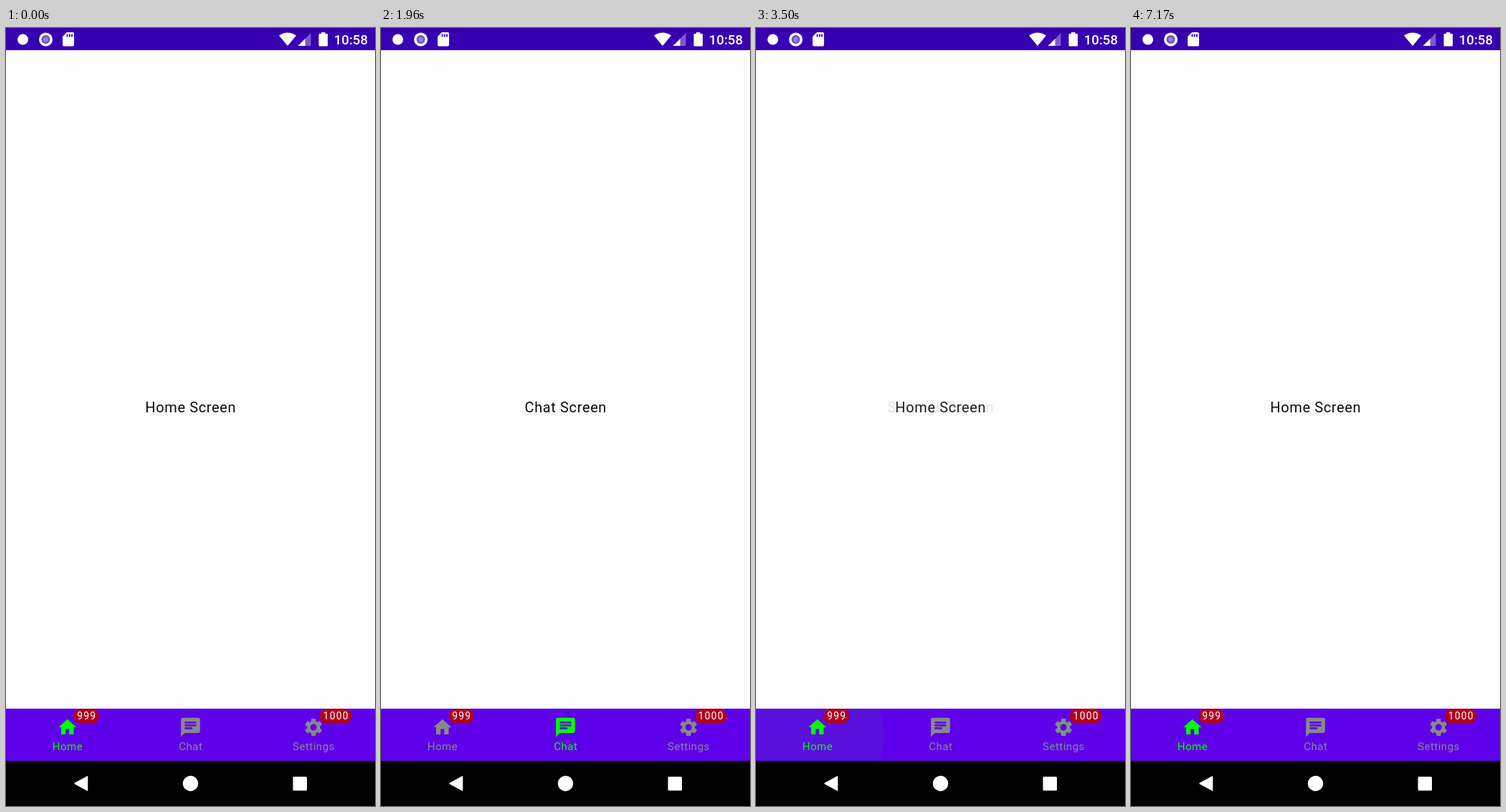
An HTML page for the animation above (7210 ms loop, 515 by 1087 pixels).

```html
<!DOCTYPE html>
<html lang="en">
<head>
<meta charset="utf-8">
<title>Bottom navigation</title>
<style>
  html, body { margin: 0; width: 100%; height: 100%; overflow: hidden; background: #fdfdfd; }
  svg { display: block; width: 100vw; height: 100vh; }
  text { font-family: Roboto, sans-serif; text-anchor: middle; }
  .title { font-size: 20px; letter-spacing: .626px; fill: #0c0c0c; }
  .label { font-size: 15px; letter-spacing: .5px; }
  .badge { font-size: 13.8px; letter-spacing: 1.3px; fill: #fff; }
  .clock { font-size: 18.6px; font-weight: 500; text-anchor: end; fill: #fff; }
</style>
</head>
<body>
<svg viewBox="0 0 515 1087" preserveAspectRatio="none">
  <defs>
    <clipPath id="barClip"><rect y="951" width="515" height="73"/></clipPath>
    <path id="tooth" d="M-2.75-6.3 -2.35-9.3Q-2.3-9.6-1.95-9.6H1.95Q2.3-9.6 2.35-9.3L2.75-6.3Z"/>
  </defs>
  <rect width="515" height="1087" fill="#fdfdfd"/>

  <!-- Status bar -->
  <rect width="515" height="31" fill="#3700b1"/>
  <g fill="#fff">
    <circle cx="23.5" cy="16" r="7.5"/>
    <circle cx="55.5" cy="16" r="9.5"/>
    <circle cx="55.5" cy="16" r="6" fill="#6a4fc6"/>
    <circle cx="55.5" cy="16" r="3.4" fill="#9282d8"/>
    <path d="M85 6H93Q95 6 95 8V23.5Q95 25.5 93 25.5H81Q79 25.5 79 23.5V12Z"/>
    <path d="M85.5 8.5V12.5M88.8 8.5V12.5M92 8.5V12.5" stroke="#3700b1" stroke-width="1.8"/>
    <path d="M393 25 381 10.5Q393 2.500 405 10.5Z"/>
    <path d="M407.500 25H425.500V7Z" opacity=".35"/>
    <path d="M407.500 25H417.500V15Z"/>
    <path d="M440 6H445.500V8H448Q449 8 449 9V24.500Q449 25.500 448 25.500H437.500Q436.500 25.500 436.500 24.500V9Q436.500 8 437.500 8H440Z"/>
  </g>
  <text class="clock" x="505" y="22.800">10:58</text>

  <g id="titles"></g>

  <!-- Tab bar -->
  <rect y="951" width="515" height="73" fill="#5f00eb"/>
  <g id="ripples" clip-path="url(#barClip)"></g>
  <g id="tabs"></g>
  <g id="badges"></g>

  <!-- System buttons -->
  <rect y="1024" width="515" height="63" fill="#000"/>
  <g fill="#fff">
    <path d="M96 1055.500 113.500 1045.800V1065.200Z" stroke="#fff" stroke-width="1.500" stroke-linejoin="round"/>
    <circle cx="257.500" cy="1055.500" r="10.700"/>
    <rect x="400.500" y="1046" width="19.500" height="19.500" rx="1.500"/>
  </g>
</svg>
<script>
const LOOP = 7210, FADE = 300, PRESS = 90;
const GREY = [136, 136, 136], GREEN = [0, 255, 0];

const gear = '<circle r="5.4" fill="none" stroke="currentColor" stroke-width="3.6"/>' +
  [0, 1, 2, 3, 4, 5].map(i => `<use href="#tooth" transform="rotate(${i * 60})"/>`).join('');
const tabs = [
  { name: 'Home', x: 85.7, scale: 1.25,
    icon: '<path d="M-2 8V2H2V8H7V0H10L0-9-10 0H-7V8Z"/>' },
  { name: 'Chat', x: 257.5, scale: 1.33,
    icon: '<path fill-rule="evenodd" d="M8-10H-8Q-10-10-10-8V10L-6 6H8Q10 6 10 4V-8Q10-10 8-10ZM-6-3H6V-1H-6ZM-6 0H2V2H-6ZM-6-6H6V-4H-6Z"/>' },
  { name: 'Settings', x: 429.2, scale: 1.25, icon: gear }
];
const badges = [
  { x: 94.2, w: 36, text: '999' },
  { x: 437.5, w: 45.3, text: '1000' }
];
// Each tap: time of the press, tab left, tab entered
const taps = [
  { at: 1170, from: 0, to: 1 },
  { at: 2250, from: 1, to: 2 },
  { at: 3170, from: 2, to: 0 }
];

const el = id => document.getElementById(id);
el('titles').innerHTML = tabs.map(t =>
  `<text class="title" x="257.8" y="536.5">${t.name} Screen</text>`).join('');
el('ripples').innerHTML = tabs.map(t =>
  `<circle cx="${t.x}" cy="987.5" r="0" fill="#0f0"/>`).join('');
el('tabs').innerHTML = tabs.map(t =>
  `<g fill="currentColor"><g transform="translate(${t.x} 977) scale(${t.scale})">${t.icon}</g>` +
  `<text class="label" x="${t.x + .25}" y="1009.3">${t.name}</text></g>`).join('');
el('badges').innerHTML = badges.map(b =>
  `<rect x="${b.x}" y="951" width="${b.w}" height="20.8" rx="10.4" fill="#b00020"/>` +
  `<text class="badge" x="${b.x + b.w / 2 + .6}" y="966.4">${b.text}</text>`).join('');

const titleEls = [...el('titles').children];
const rippleEls = [...el('ripples').children];
const tabEls = [...el('tabs').children];

const clamp = v => Math.max(0, Math.min(1, v));
const ease = p => p * p * (3 - 2 * p);
const mix = (a, b, p) => a.map((v, i) => Math.round(v + (b[i] - v) * p));

function selection(t) {
  const amount = [1, 0, 0];
  for (const tap of taps) {
    const p = ease(clamp((t - tap.at - PRESS) / FADE));
    if (p > 0) {
      amount[tap.from] = 1 - p;
      amount[tap.to] = p;
    }
  }
  return amount;
}

function draw(t) {
  const amount = selection(t);
  tabs.forEach((tab, i) => {
    titleEls[i].setAttribute('opacity', amount[i]);
    tabEls[i].style.color = `rgb(${mix(GREY, GREEN, amount[i])})`;
    const tap = taps.find(k => k.to === i);
    const age = t - tap.at;
    const grow = 1 - (1 - clamp(age / 225)) ** 2;
    const shade = clamp(age / 75) * (1 - clamp((age - 225) / 150));
    rippleEls[i].setAttribute('r', 28 + 65 * grow);
    rippleEls[i].setAttribute('opacity', .2 * shade);
  });
}

const start = performance.now();
function tick(now) {
  draw(Math.max(0, now - start) % LOOP);
  requestAnimationFrame(tick);
}
draw(0);
requestAnimationFrame(tick);
</script>
</body>
</html>
```
